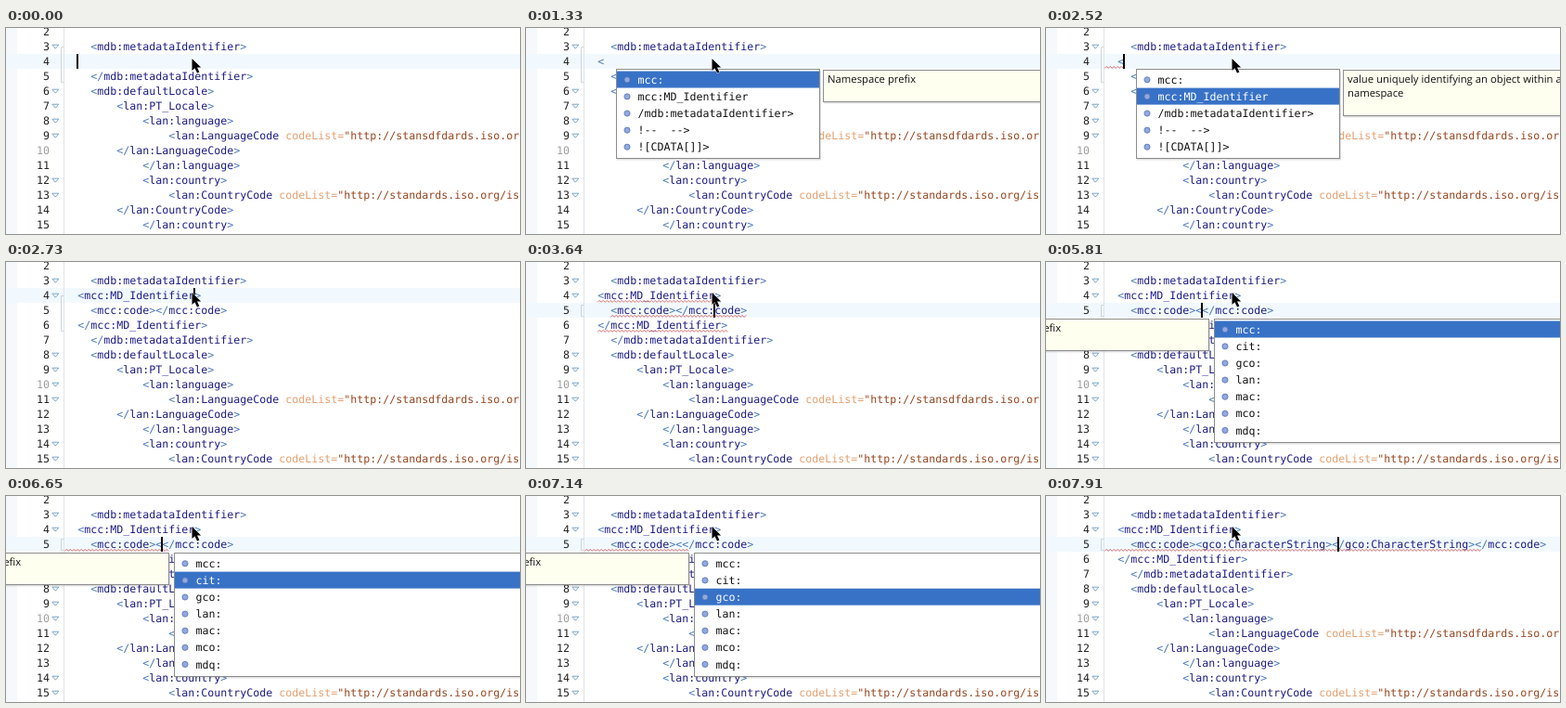
These frames come from a looping animation (554 by 222 pixels, 8 s). An HTML page:

```html
<!DOCTYPE html>
<html lang="en">
<head>
<meta charset="utf-8">
<title>XML content completion</title>
<style>
  html, body { margin: 0; width: 100%; height: 100%; overflow: hidden; background: #fff; }
  svg { display: block; width: 554px; height: 222px; }
  text { white-space: pre; text-rendering: geometricPrecision; }
  .code { font: 11.63px "DejaVu Sans Mono", monospace; }
  .tip { font: 11.3px "Open Sans", sans-serif; fill: #111; }
</style>
</head>
<body>
<svg id="stage" viewBox="0 0 554 222"></svg>
<script>
const LOOP = 8000, CHAR = 7, ROW = 16, LEFT = 63.2;
const stage = document.getElementById('stage');

const COLORS = { bracket: '#4677b5', name: '#1c1c84', attr: '#e3a070', value: '#96451f' };

const colX = col => LEFT + col * CHAR;
const rowTop = row => 28 + (row - 4) * ROW;
const baseline = row => rowTop(row) + 12.2;
const esc = s => s.replace(/&/g, '&amp;').replace(/</g, '&lt;').replace(/>/g, '&gt;');
const rect = (x, y, w, h, fill, more = '') =>
  `<rect x="${x}" y="${y}" width="${w}" height="${h}" fill="${fill}" ${more}/>`;
const label = (x, y, s, cls, more = '') => `<text x="${x}" y="${y}" class="${cls}" ${more}>${s}</text>`;

// Value of the last [time, value] pair that has been reached
function at(keys, t) {
  let value = keys[0][1];
  for (const [time, v] of keys) if (t >= time) value = v;
  return value;
}

const HEAD = [[0, ''], [4, '<mdb:metadataIdentifier>']];
const TAIL = [
  [4, '</mdb:metadataIdentifier>'],
  [4, '<mdb:defaultLocale>'],
  [8, '<lan:PT_Locale>'],
  [12, '<lan:language>'],
  [16, '<lan:LanguageCode codeList="http://stansdfdards.iso.org/iso"'],
  [8, '</lan:LanguageCode>'],
  [12, '</lan:language>'],
  [12, '<lan:country>'],
  [16, '<lan:CountryCode codeList="http://standards.iso.org/iso/19115"'],
  [8, '</lan:CountryCode>'],
  [12, '</lan:country>']
];

const identifier = content => [
  [2, '<mcc:MD_Identifier>'],
  [4, `<mcc:code>${content}</mcc:code>`],
  [2, '</mcc:MD_Identifier>']
];

const BODY = [
  [0, [[2, '']]],
  [980, [[2, '<']]],
  [2590, identifier('')],
  [5390, identifier('<')],
  [7210, identifier('<gco:CharacterString></gco:CharacterString>')]
];

const CARET_ON = [[0, 1], [350, 0], [840, 1], [1330, 0], [1890, 1], [3010, 0], [3220, 1],
  [4340, 0], [4760, 1], [5250, 0], [5390, 1], [6020, 0], [6440, 1], [6930, 0],
  [7210, 1], [7630, 0], [7770, 1]];
const CARET_ROW = [[0, 4], [3220, 5]];

function caretCol(t) {
  if (t >= 3710 && t < 5390) return Math.max(14, 19 - Math.floor((t - 3710) / 70));
  return at([[0, 2], [980, 3], [2590, 20], [5390, 15], [7210, 35], [7770, 36]], t);
}

// Error underlines as [row, first column, last column]
const ERRORS = [
  [0, []],
  [1960, [[4, 0, 3]]],
  [2590, []],
  [3290, [[4, 2, 21], [5, 4, 25], [6, 2, 22]]],
  [3990, []],
  [6440, [[5, 0, 16]]],
  [7210, [[5, 0, 58]]]
];

const PREFIX = ['Namespace prefix'];
const MENUS = [
  {
    from: 1120, to: 2590, x: 97, y: 44.5, w: 220, h: 96,
    items: ['mcc:', 'mcc:MD_Identifier', '/mdb:metadataIdentifier>', '!--  -->', '![CDATA[]]>'],
    pick: [[0, 0], [2030, 1]],
    tipX: 320, tipW: 260, tipY: 45.5,
    tips: [[0, null], [1330, PREFIX],
      [2100, ['value uniquely identifying an object within a', 'namespace']]]
  },
  {
    from: 5740, to: 7210, x: 181, y: 61.5, w: 400, h: 133,
    items: ['mcc:', 'cit:', 'gco:', 'lan:', 'mac:', 'mco:', 'mdq:'],
    pick: [[0, 0], [6510, 1], [6930, 2]],
    tipX: -84, tipW: 260, tipY: 61.5,
    tips: [[0, null], [5810, PREFIX]]
  }
];

function colored(source) {
  const parts = source.match(/<\/?|>|"[^"]*"|\s\w+=|[^<>"\s]+/g) || [];
  return parts.map(p => {
    const kind = /^[<>]/.test(p) ? 'bracket' : p[0] === '"' ? 'value' : p[0] === ' ' ? 'attr' : 'name';
    return `<tspan fill="${COLORS[kind]}">${esc(p)}</tspan>`;
  }).join('');
}

function line([indent, source], row) {
  const y = baseline(row);
  let out = label(47, y, row, 'code', `text-anchor="end" fill="${row === 10 ? '#a0a0a0' : '#222'}"`);
  if (/^<\w/.test(source) && !source.includes('</'))
    out += `<path d="M49.8 ${y - 6} h7 l-3.5 4 z" fill="#fff" stroke="#78a5c8"/>`;
  return out + label(colX(indent), y, colored(source), 'code');
}

function squiggle([row, from, to]) {
  const y = baseline(row) + 3.2, end = colX(to);
  let d = '', up = false;
  for (let x = colX(from); x <= end; x += 2, up = !up) d += `${d ? 'L' : 'M'}${x} ${up ? y - 2 : y}`;
  return `<path d="${d}" fill="none" stroke="#d45a5a" stroke-width=".9"/>`;
}

function scopeMark(t) {
  const [top, bottom] = at([[0, [20, 58]], [2590, [36, 74]], [3220, [46, 58]]], t);
  return `<path d="M62 ${top + .5} H59.5 V${bottom + .5} H62" fill="none" stroke="#cfd4da"/>`;
}

function menu(m, t) {
  if (t < m.from || t >= m.to) return '';
  const chosen = at(m.pick, t), tip = at(m.tips, t);
  let out = rect(m.x + 1, m.y + 2, m.w, m.h, '#000', 'opacity=".12"') +
    rect(m.x + .5, m.y, m.w - 1, m.h, '#fff', 'stroke="#8c8c8c"');
  m.items.forEach((item, i) => {
    const y = m.y + 2 + i * 18.1, on = i === chosen;
    if (on) out += rect(m.x + 1, y, m.w - 2, 18, '#3872c6');
    out += `<circle cx="${m.x + 12}" cy="${y + 9.3}" r="3.1" fill="#91a9de" stroke="#5872b4" stroke-width=".8"/>`;
    out += label(m.x + 23.5, y + 13.4, esc(item), 'code', `fill="${on ? '#fff' : '#111'}"`);
  });
  if (tip) {
    const h = tip.length > 1 ? 49 : 34;
    out += rect(m.tipX + 1, m.tipY + 2, m.tipW, h, '#000', 'opacity=".12"') +
      rect(m.tipX + .5, m.tipY, m.tipW - 1, h, '#fffff0', 'stroke="#8c8c8c"');
    tip.forEach((s, i) => { out += label(m.tipX + 5, m.tipY + 13.8 + i * 14.6, s, 'tip'); });
  }
  return out;
}

const POINTER = '<path d="M200.5 33 v13 l3 -2.8 l2.5 5.3 l2.4 -1.1 l-2.4 -5 h4.2 z" ' +
  'fill="#000" stroke="#fff" stroke-width="1" paint-order="stroke"/>';

function scene(t) {
  const row = at(CARET_ROW, t);
  const lines = [...HEAD, ...at(BODY, t), ...TAIL].slice(0, 14);
  return rect(0, 0, 554, 222, '#fff') +
    rect(0, 0, 12, 222, '#f5f9fc') +
    rect(0, rowTop(row), 554, ROW, '#f2f9fe') +
    rect(62, 0, 1, 222, '#dfe4ea') +
    scopeMark(t) +
    lines.map((l, i) => line(l, i + 2)).join('') +
    at(ERRORS, t).map(squiggle).join('') +
    (at(CARET_ON, t) ? rect(62 + caretCol(t) * CHAR, rowTop(row), 2, ROW, '#000') : '') +
    MENUS.map(m => menu(m, t)).join('') +
    POINTER;
}

let shown = '';
const start = performance.now();
function tick() {
  const next = scene((performance.now() - start) % LOOP);
  if (next !== shown) stage.innerHTML = shown = next;
  requestAnimationFrame(tick);
}
tick();
</script>
</body>
</html>
```
